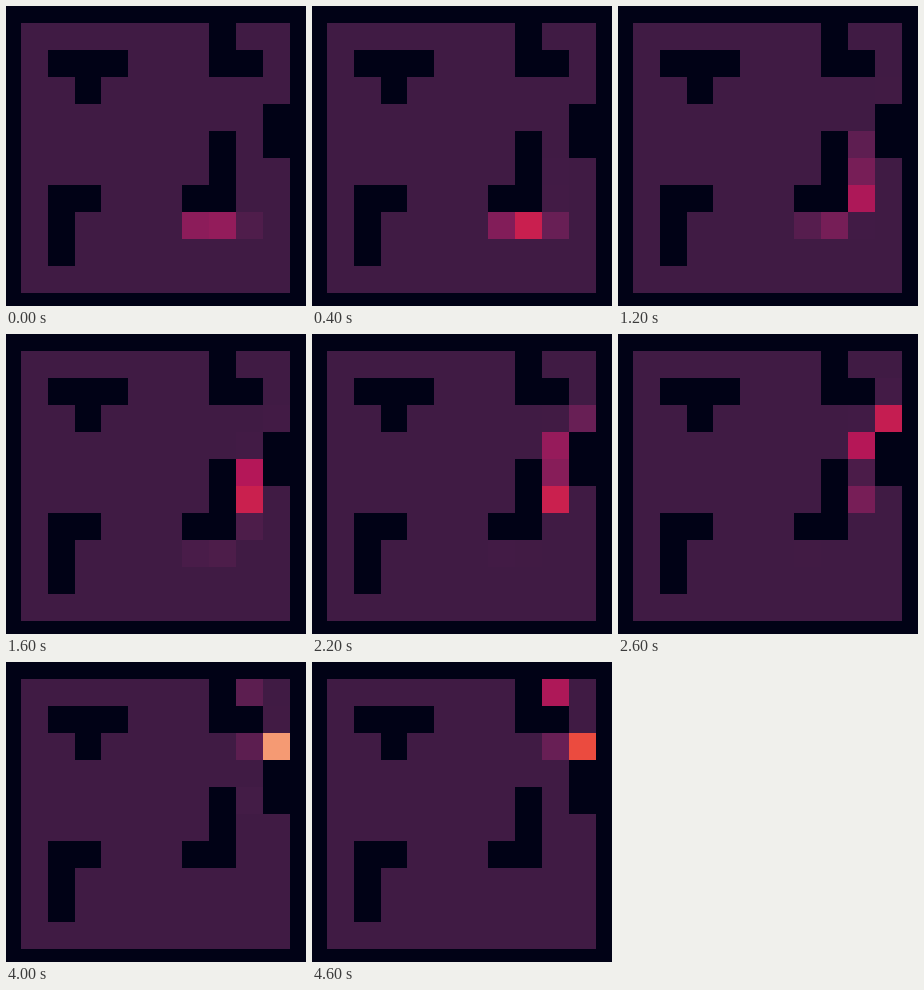
Animation of 300 by 300 pixels, one loop 4.8 s. Source, as an HTML page with a canvas:

```html
<!DOCTYPE html>
<html lang="en">
<head>
<meta charset="utf-8">
<title>Grid localisation</title>
<style>
html, body { margin: 0; width: 100%; height: 100%; overflow: hidden; background: #010216; }
canvas { display: block; }
</style>
</head>
<body>
<canvas id="stage" width="300" height="300"></canvas>
<script>
const ctx = document.getElementById('stage').getContext('2d');
const STEP = 200, STEPS = 24, BASE = 0.17, PITCH = 26.95;

const map = [
  '.......#..',
  '.###...##.',
  '..#.......',
  '.........#',
  '.......#.#',
  '.......#..',
  '.##...##..',
  '.#........',
  '.#........',
  '..........'
];

const palette = [
  '03051a', '221331', '451c47', '691f55', '921c5b', 'b91657',
  'd92847', 'ed503e', 'f47d57', 'f6a47c', 'f7c9aa', 'faebdd'
].map(hex => hex.match(/../g).map(pair => parseInt(pair, 16)));

// The belief swells and fades around each visited cell.
const visit = (row, col, peak, width, height) => ({ row, col, peak, width, height });
const visits = [
  visit(7, 6, 0, 5.5, 0.18),
  visit(7, 7, 2.6, 3.5, 0.34),
  visit(7, 8, 2, 2, 0.1),
  visit(6, 8, 5.5, 1.7, 0.28),
  visit(5, 8, 9.5, 3.3, 0.41),
  visit(4, 8, 9, 2.5, 0.32),
  visit(3, 8, 12.3, 2, 0.31),
  visit(2, 9, 14.5, 3, 0.36),
  visit(1, 9, 16, 2, 0.06),
  visit(4, 8, 17, 2, 0.07),
  visit(2, 9, 20.5, 4.5, 0.62),
  visit(2, 8, 23, 5, 0.1),
  visit(0, 8, 23, 2.6, 0.26)
];

function level(row, col, step) {
  return visits
    .filter(v => v.row === row && v.col === col)
    .reduce((sum, v) => sum + v.height * Math.exp(-(((step - v.peak) / v.width) ** 2)), BASE);
}

function color(value) {
  const pos = value * (palette.length - 1);
  const i = Math.floor(pos);
  return `rgb(${palette[i].map((v, k) => Math.round(v + (palette[i + 1][k] - v) * (pos - i)))})`;
}

const edgeX = col => Math.round(14.6 + PITCH * col);
const edgeY = row => Math.round(17 + PITCH * row);

function draw() {
  const step = Math.floor(performance.now() / STEP) % STEPS;
  ctx.fillStyle = '#010216';
  ctx.fillRect(0, 0, 300, 300);
  map.forEach((line, row) => [...line].forEach((mark, col) => {
    if (mark === '#') return;
    const x = edgeX(col), y = edgeY(row);
    ctx.fillStyle = color(level(row, col, step));
    ctx.fillRect(x, y, edgeX(col + 1) - x, edgeY(row + 1) - y);
  }));
  requestAnimationFrame(draw);
}
draw();
</script>
</body>
</html>
```
